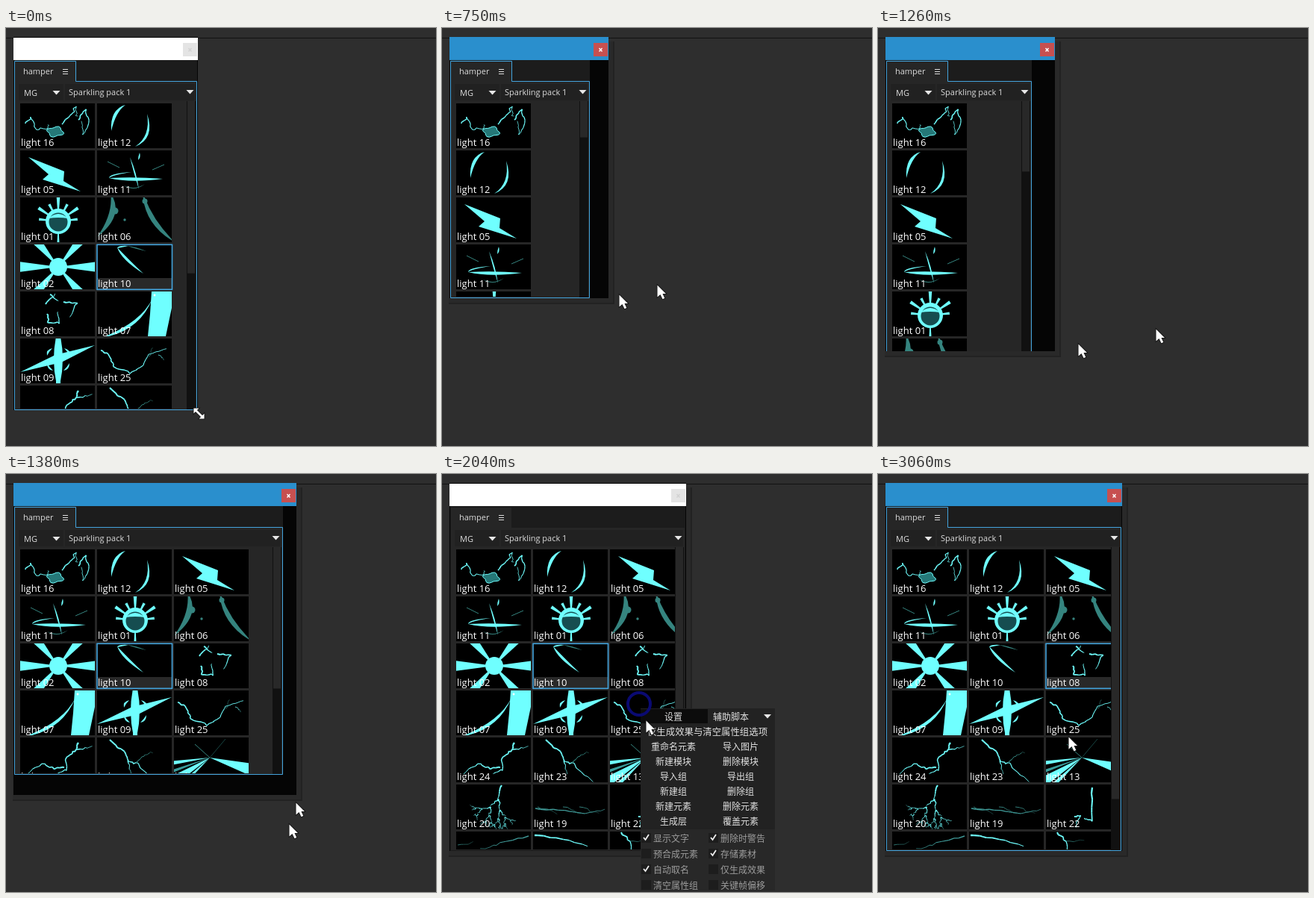
Animation of 576 by 560 pixels, one loop 3.75 s. Source, as an HTML page with a canvas:

```html
<!DOCTYPE html>
<html lang="en">
<head>
<meta charset="utf-8">
<title>Resizable panel</title>
<style>
html, body { margin: 0; width: 100%; height: 100%; overflow: hidden; background: #2e2e2e; }
canvas { display: block; width: 576px; height: 560px; }
</style>
</head>
<body>
<canvas id="stage" width="576" height="560"></canvas>
<script>
const g = document.getElementById('stage').getContext('2d');
const LOOP = 3750, STEP = 30;
const GRAB = 60, DROP = 1590, MENU_ON = 1980, MENU_OFF = 2490, PICK = 2910;
const CYAN = '#6fffff', DIM = '#35847f', BLUE = '#43a3dc';
const SANS = '"Open Sans", "Noto Sans", sans-serif';
const CJK = '"Noto Sans CJK SC", "Noto Sans CJK", sans-serif';

// pointer path as [time, x, y]; it holds the window corner until DROP
const path = [
  [GRAB, 257, 512], [240, 270, 524], [690, 199, 362], [750, 223, 362], [810, 288, 344],
  [960, 384, 462], [1020, 376, 489], [1080, 283, 524], [1200, 207, 466], [1260, 237, 433],
  [1320, 372, 403], [1470, 372, 485], [1530, 333, 502], [DROP, 327, 505],
  [1950, 270, 324], [2040, 270, 324], [2340, 336, 478], [2740, 106, 366], [PICK, 252, 240], [3060, 255, 352]
];

// smooth curve through the path points
function at(t) {
  const n = path.length - 1;
  t = Math.min(Math.max(t, path[0][0]), path[n][0]);
  const i = Math.max(1, path.findIndex(p => p[0] >= t));
  const a = path[i - 1], b = path[i], before = path[Math.max(0, i - 2)], after = path[Math.min(n, i + 1)];
  const d = b[0] - a[0], u = (t - a[0]) / d;
  return [1, 2].map(k => {
    const va = (b[k] - before[k]) / (b[0] - before[0]) * d;
    const vb = (after[k] - a[k]) / (after[0] - a[0]) * d;
    const rise = b[k] - a[k];
    return Math.round(a[k] + u * (va + u * (3 * rise - 2 * va - vb + u * (va + vb - 2 * rise))));
  });
}
const corner = t => at(Math.min(t, DROP));

let seed = 1;
const rnd = () => (seed = seed * 16807 % 2147483647) / 2147483647;

function box(x, y, w, h, color) { g.fillStyle = color; g.fillRect(x, y, w, h); }

function text(s, x, y, size, color = '#fff', align = 'left', font = SANS) {
  g.font = size + 'px ' + font;
  g.textAlign = align;
  g.fillStyle = color;
  g.fillText(s, x, y);
}

function trace(p) {
  g.beginPath();
  for (let i = 0; i < p.length; i += 2) g.lineTo(p[i], p[i + 1]);
}
function poly(p, color = CYAN) { trace(p); g.closePath(); g.fillStyle = color; g.fill(); }
function line(p, w = 1, color = CYAN) { trace(p); g.lineWidth = w; g.strokeStyle = color; g.stroke(); }
function disc(x, y, r, color = CYAN) {
  g.beginPath(); g.arc(x, y, r, 0, 7); g.fillStyle = color; g.fill();
}
// sliver between two curves that share their ends
function blade(x0, y0, ax, ay, x1, y1, bx, by, color = CYAN) {
  g.beginPath();
  g.moveTo(x0, y0);
  g.quadraticCurveTo(ax, ay, x1, y1);
  g.quadraticCurveTo(bx, by, x0, y0);
  g.fillStyle = color;
  g.fill();
}
// wedge from a centre, given direction, half width (degrees) and length
function ray(cx, cy, angle, half, len, color = CYAN) {
  const p = [cx, cy];
  for (const a of [angle - half, angle + half])
    p.push(cx + len * Math.cos(a * Math.PI / 180), cy + len * Math.sin(a * Math.PI / 180));
  poly(p, color);
}
// jagged, tapering discharge along a few points
function spark(p, w = 1.8, color = CYAN) {
  const cuts = 5, total = (p.length / 2 - 1) * cuts;
  let [x, y] = p;
  for (let s = 1; s <= total; s++) {
    const i = 2 * Math.ceil(s / cuts) - 2, u = (s - 1) % cuts / cuts + 1 / cuts;
    const nx = p[i] + (p[i + 2] - p[i]) * u + 3 * (rnd() - .5);
    const ny = p[i + 1] + (p[i + 3] - p[i + 1]) * u + 3 * (rnd() - .5);
    line([x, y, nx, ny], w * (1.2 - .7 * s / total), color);
    x = nx; y = ny;
  }
}
function tree(x, y, angle, len, w) {
  if (len < 6) return;
  const x1 = x + len * Math.cos(angle), y1 = y + len * Math.sin(angle);
  spark([x, y, x1, y1], w);
  for (const side of [-1, 1]) tree(x1, y1, angle + side * (.25 + .4 * rnd()), len * .78, w * .8);
}

// one drawing per item, each in a 100 x 60 cell
const items = [
  ['16', () => {
    spark([7, 27, 15, 18, 21, 34, 38, 34, 38, 29], 1.3);
    const blob = [];
    for (let a = 0; a < 6.3; a += .3) {
      const r = 8 + 1.5 * Math.sin(4 * a);
      blob.push(47 + 1.3 * r * Math.cos(a), 38 + .8 * r * Math.sin(a));
    }
    poly(blob, '#257878');
    line(blob);
    spark([56, 28, 70, 15, 74, 4, 76, 18], 1.4);
    spark([78, 22, 87, 8, 92, 27, 84, 42, 82, 25], 1.4);
  }],
  ['12', () => {
    blade(19, 37, 17, 8, 38, 2, 25, 11);
    blade(67, 14, 78, 47, 51, 58, 72, 44);
  }],
  ['05', () => poly([11, 9, 59, 28, 58, 41, 81, 55, 30, 39, 38, 32])],
  ['11', () => {
    blade(16, 37, 45, 44, 88, 38, 50, 35);
    blade(16, 37, 16, 31, 46, 29, 20, 33);
    blade(44, 9, 49, 30, 56, 52, 53, 30);
    blade(55, 13, 59, 9, 57, 3, 55, 8);
    blade(36, 47, 50, 56, 64, 45, 50, 54, DIM);
    line([14, 15, 30, 23], 1, DIM);
    line([74, 26, 90, 19], 1, DIM);
  }],
  ['01', () => {
    for (let k = -3; k <= 3; k++) ray(51, 32, k * 28 - 90, 4, k % 2 ? 26 : 32);
    ray(51, 32, 90, 3, 32);
    disc(51, 32, 17);
    disc(51, 33, 12.5, '#164d50');
    blade(38, 28, 51, 16, 64, 28, 51, 26);
  }],
  ['06', () => {
    blade(18, -6, 38, 24, 0, 53, 22, 22, DIM);
    disc(24, 18, 4.5, DIM);
    disc(37, 30, 1.7, DIM);
    blade(61, -8, 62, 36, 104, 60, 72, 28, DIM);
    disc(64, 5, 3.5, DIM);
  }],
  ['02', () => {
    for (const a of [0, 50, 130, 180, 230, 310]) ray(51, 30, a, 7.5, 70);
    disc(51, 30, 12);
  }],
  ['10', () => {
    blade(27, 4, 32, 20, 62, 39, 42, 20);
    blade(27, 5, 28, 1, 42, 2, 32, 4);
    blade(40, 2, 52, 3, 66, 9, 52, 6, DIM);
  }],
  ['08', () => {
    spark([34, 17, 47, 4]);
    spark([40, 4, 51, 13]);
    spark([58, 14, 76, 15, 66, 35]);
    spark([36, 30, 38, 43, 53, 42, 50, 27]);
  }],
  ['07', () => {
    poly([73, 0, 100, 0, 100, 22, 92, 60, 68, 60, 71, 30]);
    blade(74, 10, 58, 42, 6, 62, 56, 54);
    disc(77, 5, 1.4, '#fff');
  }],
  ['09', () => {
    poly([0, 45, 47, 22, 100, 9, 55, 32]);
    blade(51, -14, 63, 27, 51, 70, 39, 27);
    box(48, 0, 6, 60, CYAN);
    for (const s of [-1, 1]) {
      blade(51 + 8 * s, 13, 51 + 17 * s, 15, 51 + 15 * s, 23, 51 + 12 * s, 17);
      blade(51 + 15 * s, 33, 51 + 15 * s, 42, 51 + 7 * s, 43, 51 + 12 * s, 38);
    }
  }],
  ['25', () => {
    spark([5, 16, 15, 20, 22, 38, 45, 46, 58, 40, 70, 22, 94, 14], 1.6);
    spark([69, 24, 75, 12], .8, DIM);
    spark([82, 22, 88, 28], .8);
  }],
  ['24', () => {
    spark([78, 7, 74, 18, 61, 26, 62, 43, 49, 50], 1.9);
    spark([59, 40, 45, 42, 29, 35, 10, 48], 1.8);
    spark([76, 16, 95, 12], 1.3);
  }],
  ['23', () => {
    spark([17, 3, 36, 20, 42, 31, 54, 36, 79, 58]);
    spark([52, 34, 65, 22, 74, 20], 1, DIM);
    spark([41, 31, 46, 48], 1.2);
  }],
  ['13', () => {
    [3, 2, 6, 3].forEach((half, k) => ray(48, 27, 172 - 12 * k, half, 90, k === 1 ? '#399c9b' : CYAN));
    ray(48, 27, 16, 8, 90);
    line([28, 9, 48, 27], 1, DIM);
    line([48, 27, 69, 2], .8, '#1d5654');
  }],
  ['20', () => tree(61, 1, 1.8, 19, 2)],
  ['19', () => {
    spark([3, 32, 42, 34, 70, 38, 97, 34], 1.4, '#419d9b');
    for (const x of [6, 40, 62]) spark([x, 30, x + 26, 39], .9, DIM);
  }],
  ['22', () => {
    spark([62, 4, 62, 48, 50, 46], 2);
    spark([38, 43, 46, 42, 39, 57], 1.7);
  }],
  ['21', () => {
    spark([97, 6, 60, 16, 32, 23], 1.2, '#419d9b');
    spark([2, 18, 24, 14], .8, DIM);
  }],
  ['17', () => spark([2, 5, 30, 9, 74, 19], 2)],
  ['18', () => {
    spark([15, 1, 27, 13, 30, 28]);
    spark([27, 13, 50, 12], .8, DIM);
  }]
];
const TOTAL = 23;

function cell(i, x, y, chosen) {
  const [name, art] = items[i];
  seed = 977 * (i + 3);
  g.save();
  g.translate(x, y);
  g.beginPath(); g.rect(0, 0, 100, 60); g.clip();
  box(0, 0, 100, 60, '#000');
  art();
  if (chosen) box(0, 45, 100, 15, '#292929');
  g.restore();
  text('light ' + name, x + 1, y + 57, 13);
  if (chosen) {
    g.strokeStyle = BLUE;
    g.lineWidth = 1.6;
    g.strokeRect(x, y + .3, 100.5, 60);
  }
}

function caret(x, y) { poly([x - 5, y, x + 5, y, x, y + 5.5], '#e6e6e6'); }

function panel(right, bottom, focus, chosen) {
  box(11, 43, right - 11, 29, '#1c1c1c');
  box(11, 71, right - 11, bottom - 71, '#262626');
  box(11, 44, 83, 28, '#262626');

  text('hamper', 23, 62, 11, '#dcdcdc');
  for (let y = 55; y < 63; y += 3) box(76, y, 7, 1, '#dcdcdc');

  box(17, 75, 60, 22, '#212121');
  box(79, 75, right - 82, 22, '#212121');
  text('MG', 24, 91, 11, '#dcdcdc');
  caret(67.5, 84);
  text('Sparkling pack 1', 84, 90, 11, '#dcdcdc');
  caret(right - 9.5, 83);

  const cols = Math.max(1, Math.floor((right - 32) / 103 + .2));
  const view = bottom - 98, full = Math.ceil(TOTAL / cols) * 63 - 13;
  g.save();
  g.beginPath(); g.rect(12, 98, right - 26, view - 2); g.clip();
  items.forEach(([name], i) => {
    const y = 101 + 63 * Math.floor(i / cols);
    if (y < bottom) cell(i, 19 + 103 * (i % cols), y, name === chosen);
  });
  g.restore();

  box(right - 14, 98, 12, view - 1, '#111');
  box(right - 13, 98, 10, Math.min(view, view * view / full), '#282828');

  const r = right - .5, b = bottom - .5;
  line([11.5, b, 11.5, 44.5, 93.5, 44.5, 93.5, 71.5, r, 71.5, r, b, 11.5, b], 1, focus ? BLUE : '#1b1b1b');
}

function frame(right, bottom, active, shade) {
  if (shade) {
    box(9, 18, right - 1, bottom - 10, '#222');
    box(9, 18, right - 3, bottom - 12, '#292929');
  }
  box(10, 12, right - 10, bottom - 12, '#050505');
  box(10, active ? 12 : 13, right - 10, active ? 31 : 30, active ? '#2a8fcd' : '#fff');
  box(right - 20, 20, 19, 18, active ? '#c75050' : '#e4e4e4');
  const x = right - 10.5, c = active ? '#fff' : '#d2d2d2';
  line([x - 2, 27, x + 2, 31.5], 1.4, c);
  line([x + 2, 27, x - 2, 31.5], 1.4, c);
}

const rows = [['重命名元素', '导入图片'], ['新建模块', '删除模块'], ['导入组', '导出组'],
  ['新建组', '删除组'], ['新建元素', '删除元素'], ['生成层', '覆盖元素']];
const options = ['显示文字', '删除时警告', '预合成元素', '存储素材', '自动取名', '仅生成效果', '清空属性组', '关键帧偏移'];
const ticked = ['显示文字', '删除时警告', '存储素材', '自动取名'];

function menu() {
  const put = (s, x, y, size = 12) => text(s, x, y + 4.5, size, '#e2e2e2', 'center', CJK);
  box(266, 314, 180, 162, '#222');
  box(266, 476, 180, 82, '#282828');
  box(266, 315, 90, 19, '#0c0c0c');
  put('设置', 310, 325);
  put('辅助脚本', 387, 325);
  caret(436, 322);
  put('仅生成效果与清空属性组选项', 355.5, 345, 12.4);
  rows.forEach((r, i) => r.forEach((s, k) => put(s, 310 + 90 * k, 365.5 + 20 * i)));
  options.forEach((s, i) => {
    const x = 267 + 90 * (i % 2), y = 488 + 21 * Math.floor(i / 2);
    box(x, y - 7, 13, 13, '#1d1d1d');
    if (ticked.includes(s)) line([x + 3, y - 1, x + 5.5, y + 2, x + 10, y - 5], 1.8, '#eee');
    text(s, x + 16, y + 5, 12, '#9c9c9c', 'left', CJK);
  });
}

function glyph(p, x, y, turn = 0) {
  g.save();
  g.translate(x + .5, y + .5);
  g.rotate(turn);
  trace(p);
  g.closePath();
  g.lineWidth = 1.6;
  g.strokeStyle = '#111';
  g.stroke();
  g.fillStyle = '#fff';
  g.fill();
  g.restore();
}
const pointer = ([x, y]) => glyph([0, 0, 0, 16, 4, 12.6, 7, 18.8, 9.8, 17.6, 7, 11.6, 11.5, 11.4], x, y);
function sizer(x, y) {
  const half = [-10, 0, -5, -5, -5, -1.4, 5, -1.4, 5, -5, 10, 0];
  const back = [5, 5, 5, 1.4, -5, 1.4, -5, 5];
  glyph([...half, ...back], x, y, Math.PI / 4);
}

function ring(t, start) {
  if (t < start || t >= start + 90) return;
  const [x, y] = at(start);
  g.beginPath(); g.arc(x - 3, y - 8, 15, 0, 7);
  g.lineWidth = 4; g.strokeStyle = '#0a0a72'; g.stroke();
}

function draw(t) {
  box(0, 0, 576, 560, '#2e2e2e');
  box(0, 13, 576, 1, '#121212');

  const held = t >= GRAB, open = t >= MENU_ON && t < MENU_OFF;
  const [right, bottom] = corner(t);
  const [inR, inB] = corner(t - 60);   // contents repaint late
  frame(right, bottom, held && !open, held);

  g.save();
  g.beginPath(); g.rect(10, 43, right - 10, bottom - 43); g.clip();
  panel(inR - 1, inB, !open, t < PICK ? '10' : '08');
  g.restore();

  if (open) menu();
  ring(t, MENU_ON);
  ring(t, PICK);

  if (!held) sizer(258, 516);
  else {
    pointer(at(t + 15));
    if (t < 1530) pointer(at(t + 60));   // trailing double while dragging
  }
}

let last = -1;
const begin = performance.now();
function tick() {
  const t = Math.floor((performance.now() - begin) % LOOP / STEP) * STEP;
  if (t !== last) draw(last = t);
  requestAnimationFrame(tick);
}
tick();
</script>
</body>
</html>
```
